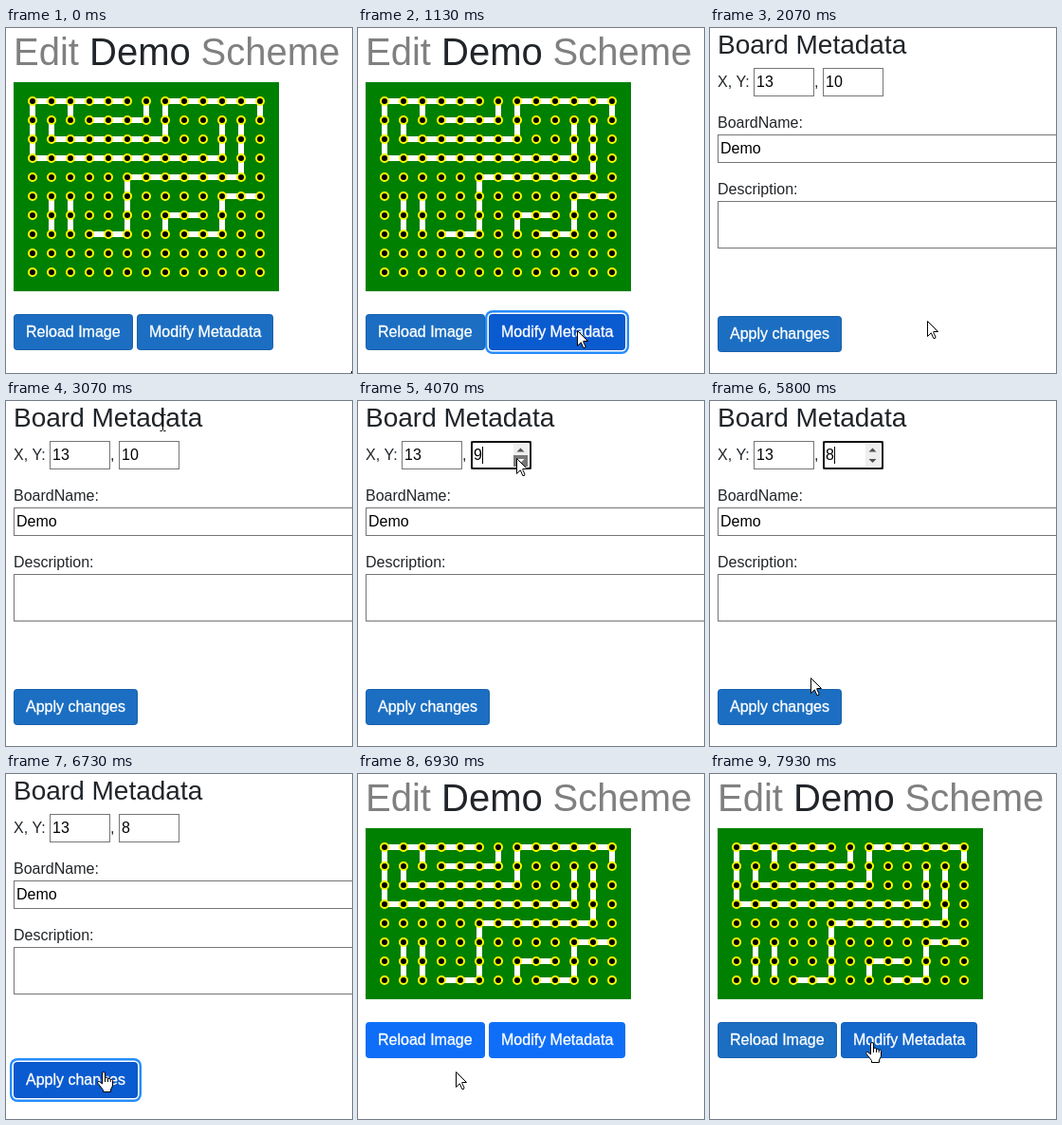
These frames come from a looping animation (365 by 363 pixels, 8000 ms). An HTML page with a canvas:

```html
<!DOCTYPE html>
<html lang="en">
<head>
<meta charset="utf-8">
<title>Board editor</title>
<style>
html, body { margin: 0; width: 100%; height: 100%; overflow: hidden; background: #fff; }
canvas { display: block; }
</style>
</head>
<body>
<canvas id="stage" width="365" height="363"></canvas>
<script>
const ctx = document.getElementById('stage').getContext('2d');
const LOOP = 8000, TICK = 200 / 3;
const INK = '#212529';

// All moments are counted in ticks of 1/15 s.
const PRESS = 15, FORM = 18, STEP1 = 61, STEP2 = 68, APPLY = 98, BOARD = 104;

// Pointer moves: start, end, x, y
const START = [364, 361];
const MOVES = [
  [0, 10, 231, 318], [30, 39, 165, 13], [43, 53, 166, 60], [56, 57, 167, 60],
  [75, 88, 104.5, 294.5], [88, 93, 103, 313], [116, 119, 171, 282]
];

// Board traces as grid points: column, row, column, row ...
const TRACES = [
  [5, 0, 0, 0, 0, 3, 10, 3, 10, 1], [2, 0, 2, 1], [3, 1, 6, 1, 6, 0],
  [1, 1, 1, 2, 7, 2, 7, 0, 12, 0, 12, 1],
  [11, 1, 11, 4, 5, 4, 5, 7, 3, 7], [1, 5, 1, 7], [2, 5, 2, 7],
  [7, 7, 7, 6, 9, 6], [8, 7, 10, 7, 10, 5, 12, 5]
];

// Button colours: fill and border
const BASE = [[27, 110, 194], [24, 97, 172]];
const PLAIN = [[13, 110, 253], [13, 110, 253]];
const HOVER = [[11, 94, 215], [10, 88, 202]];
const DOWN = [[10, 90, 208], [10, 83, 190]];

const HAND = new Path2D('M5.5 13V2a1.5 1.5 0 0 1 3 0V7.5a1.5 1.5 0 0 1 3 .5a1.5 1.5 0 0 1 2.7 .7' +
  'a1.3 1.3 0 0 1 2.3 1V15l-2 4v2.5H6.5V19.5L1 12.5c-1-2 1-2.6 2-1.6z');
const KNUCKLES = new Path2D('M8.5 7.5V11M11.5 8V11M14.2 8.7V11');
const ARROW = new Path2D('M.5 .5V16.5L4.3 12.8L6.8 18.5H8.5L9 17L6.8 12.5V11.5H11.5z');
const BEAM = new Path2D('M-3 -8.5H-1L0 -7.5L1 -8.5H3M0 -7.5V7.5M-3 8.5H-1L0 7.5L1 8.5H3');

const clamp = v => Math.max(0, Math.min(1, v));
const smooth = v => v * v * (3 - 2 * v);
const mix = (a, b, k) => a.map((c, i) => c.map((v, j) => v + (b[i][j] - v) * k));
const rgb = c => `rgb(${c.map(Math.round)})`;
const inside = ([x, y], l, t, r, b) => x >= l && x < r && y >= t && y < b;
const since = (n, start) => clamp((n - start) / 2.25);
// Buttons load in the plain blue and fade to the theme blue.
const loaded = (n, start) => mix(PLAIN, BASE, clamp((n - start + .2) / 2.2));

function pointer(n) {
  let [x, y] = START;
  for (const [from, to, tx, ty] of MOVES) {
    const k = smooth(clamp((n - from) / (to - from)));
    x += (tx - x) * k;
    y += (ty - y) * k;
  }
  return [x, y];
}

function text(str, x, y, size = 16, color = INK) {
  ctx.font = `${size}px "Liberation Sans", Arial, sans-serif`;
  ctx.fillStyle = color;
  ctx.fillText(str, x, y);
}

function rect(x, y, w, h, color, r = 0) {
  ctx.fillStyle = color;
  ctx.beginPath();
  ctx.roundRect(x, y, w, h, r);
  ctx.fill();
}

function button(label, x, y, w, colors, ring = 0) {
  if (ring) {
    const outer = 4 * ring, inner = 1.6 * ring;
    rect(x - outer, y - outer, w + 2 * outer, 38 + 2 * outer, '#258cfb', 4 + outer);
    rect(x - inner, y - inner, w + 2 * inner, 38 + 2 * inner, '#fff', 4 + inner);
  }
  rect(x, y, w, 38, rgb(colors[1]), 4);
  rect(x + 1, y + 1, w - 2, 36, rgb(colors[0]), 3);
  text(label, x + 13, y + 24, 16, '#fff');
  // Light text on blue reads slightly heavier.
  ctx.strokeStyle = '#fff';
  ctx.lineWidth = .3;
  ctx.strokeText(label, x + 13, y + 24);
}

function field(x, y, w, h, value = '') {
  ctx.strokeStyle = '#767676';
  ctx.lineWidth = 1;
  ctx.strokeRect(x + .5, y + .5, w - 1, h - 1);
  text(value, x + 3, y + 20, 16, '#000');
}

function board(rows) {
  rect(8, 57, 280, rows * 20 + 20, '#008000');
  ctx.strokeStyle = '#fff';
  ctx.lineWidth = 6;
  for (const t of TRACES) {
    ctx.beginPath();
    for (let i = 0; i < t.length; i += 2) ctx.lineTo(28 + 20 * t[i], 77 + 20 * t[i + 1]);
    ctx.stroke();
  }
  ctx.strokeStyle = '#ff0';
  ctx.fillStyle = '#000';
  ctx.lineWidth = 2;
  for (let r = 0; r < rows; r++) {
    for (let c = 0; c < 13; c++) {
      ctx.beginPath();
      ctx.arc(28 + 20 * c, 77 + 20 * r, 4, 0, 7);
      ctx.fill();
      ctx.stroke();
    }
  }
}

function boardPage(n) {
  const later = n >= BOARD;
  const rows = later ? 8 : 10, top = rows * 20 + 101;
  const base = later ? loaded(n, BOARD) : BASE;
  let modify = mix(base, HOVER, since(n, later ? 118 : 6));
  let ring = 0;
  if (!later && n >= PRESS) {
    ring = clamp((n - PRESS + 1) / 3);
    modify = mix(HOVER, DOWN, ring);
  }
  text('Edit ', 8, 39, 40, '#808080');
  text('Demo', 88, 39, 40);
  text('Scheme', 205.6, 39, 40, '#808080');
  board(rows);
  button('Reload Image', 8, top, 126, base);
  button('Modify Metadata', 138, top, 144, modify, ring);
}

function triangle(x, y, dir, color) {
  ctx.fillStyle = color;
  ctx.beginPath();
  ctx.moveTo(x - 4, y + 2 * dir);
  ctx.lineTo(x + 4, y + 2 * dir);
  ctx.lineTo(x, y - 2 * dir);
  ctx.fill();
}

function spinner(n, at) {
  const pressed = (n >= STEP1 && n < STEP1 + 2) || (n >= STEP2 && n < STEP2 + 2);
  const over = inside(at, 164, 57, 179, 69);
  rect(164, 45, 15, 24, '#efefef');
  if (pressed || over) rect(164, 57, 15, 12, pressed ? '#787878' : '#d2d2d2');
  triangle(171.5, 51.5, 1, '#505050');
  triangle(171.5, 63, -1, pressed ? '#fff' : '#505050');
}

function formPage(n, at) {
  const focused = n >= STEP1 && n < APPLY;
  text('Board Metadata', 8, 27, 28);
  text('X, Y:', 8, 62);
  field(46, 42, 64, 30, '13');
  text(',', 110, 62);
  field(119, 42, 64, 30, n < STEP1 ? '10' : n < STEP2 ? '9' : '8');
  if (focused || inside(at, 119, 42, 183, 72)) spinner(n, at);
  if (focused) {
    ctx.strokeStyle = '#101010';
    ctx.lineWidth = 2;
    ctx.beginPath();
    ctx.roundRect(120, 43, 62, 28, 2);
    ctx.stroke();
    const blink = n < STEP2 ? 0 : (n - STEP2) % 15;
    if (blink < 8) rect(131, 48, 1, 18, '#000');
  }
  text('BoardName:', 8, 105);
  field(8, 112, 400, 30, 'Demo');
  text('Description:', 8, 175);
  field(8, 182, 400, 50);

  let colors = mix(loaded(n, FORM), HOVER, since(n, 91));
  let ring = 0;
  if (n >= APPLY) {
    ring = clamp((n - APPLY + 1) / 3);
    colors = mix(HOVER, DOWN, ring);
  }
  button('Apply changes', 8, 303, 131, colors, ring);
}

function shape(n, at) {
  if ((n >= 6 && n < 17) || (n >= 91 && n < BOARD - 1) || n >= 118) return 'hand';
  if (n < FORM || n >= BOARD) return 'arrow';
  const typing = inside(at, 8, 3, 207, 35) || inside(at, 119, 42, 164, 72) ||
    inside(at, 8, 112, 365, 142) || inside(at, 8, 182, 365, 232);
  return typing ? 'beam' : 'arrow';
}

function cursor(n, at) {
  const kind = shape(n, at);
  ctx.save();
  ctx.translate(Math.round(at[0]), Math.round(at[1]));
  ctx.strokeStyle = '#000';
  ctx.fillStyle = '#fff';
  ctx.lineWidth = 1;
  if (kind === 'beam') {
    ctx.translate(.5, 0);
    ctx.stroke(BEAM);
  } else {
    if (kind === 'hand') ctx.translate(-7, 0);
    const path = kind === 'hand' ? HAND : ARROW;
    ctx.fill(path);
    ctx.stroke(path);
    if (kind === 'hand') ctx.stroke(KNUCKLES);
  }
  ctx.restore();
}

function draw(ms) {
  const n = Math.floor((ms % LOOP + 3.4) / TICK) % 120;
  const at = pointer(n);
  rect(0, 0, 365, 363, '#fff');
  if (n >= FORM && n < BOARD) formPage(n, at);
  else boardPage(n);
  cursor(n, at);
}

let begin;
function loop(now) {
  begin ??= now;
  draw(now - begin);
  requestAnimationFrame(loop);
}
draw(0);
requestAnimationFrame(loop);
</script>
</body>
</html>
```
